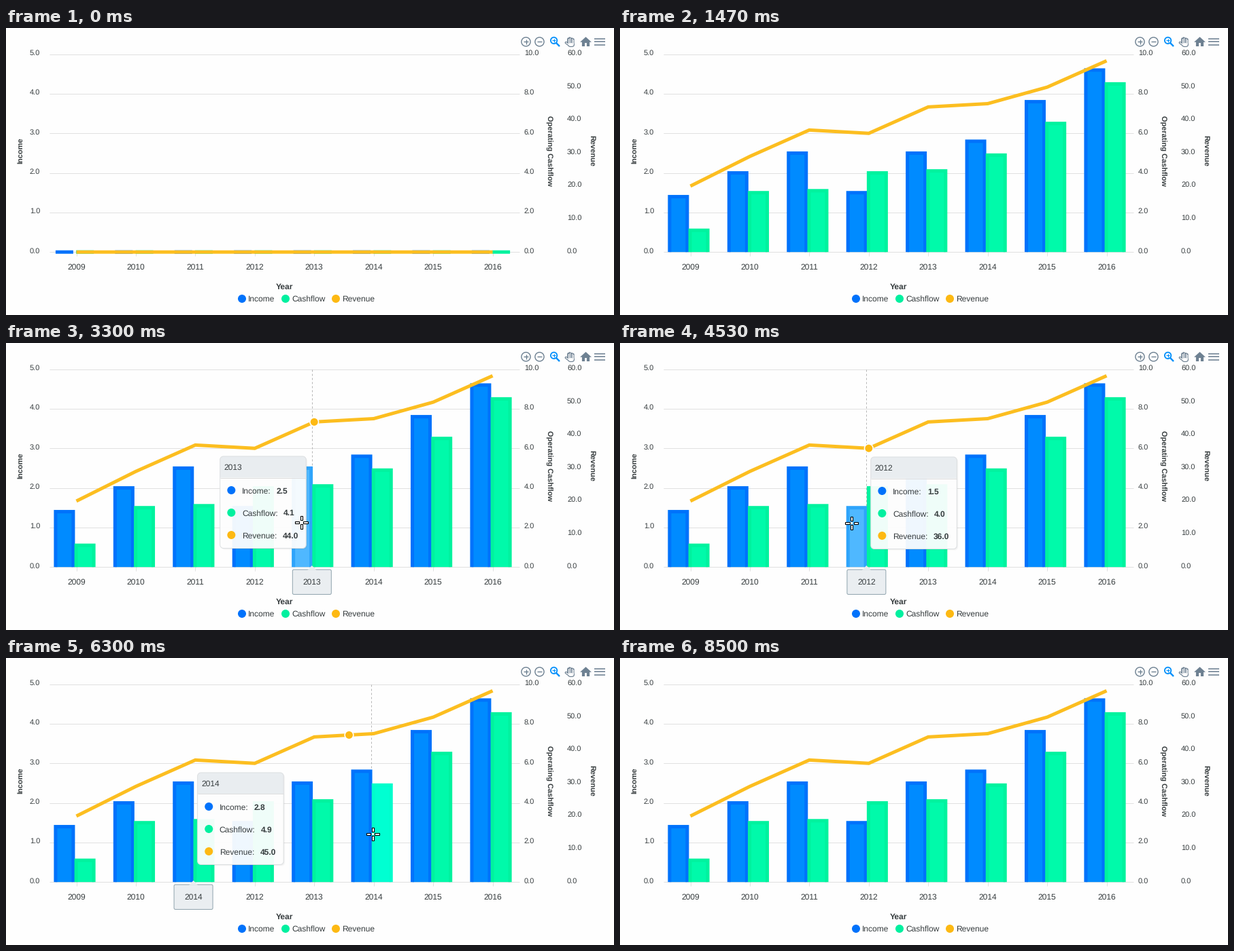
Animation of 894x423 px, one loop 9.01 s. Source, as a matplotlib script:

```python
import numpy as np
import matplotlib as mpl
import matplotlib.pyplot as plt
from matplotlib.animation import FuncAnimation
from matplotlib.patches import Circle, Polygon, Rectangle
from matplotlib.transforms import Affine2D

W, H, DPI = 894, 423, 64
LOOP, STEP = 9010, 34
PX = 72 / DPI  # one pixel in points

mpl.rcParams.update({"font.family": "Liberation Sans", "text.hinting": "none",
                     "toolbar": "None"})

YEARS = range(2009, 2017)
INCOME = np.array([1.4, 2, 2.5, 1.5, 2.5, 2.8, 3.8, 4.6])
CASH = np.array([1.1, 3, 3.1, 4, 4.1, 4.9, 6.5, 8.5])
REVENUE = np.array([20, 29, 37, 36, 44, 45, 50, 58])
TOP, BASE, LEFT, RIGHT = 38.6, 330.2, 64, 755
PLOT_H = BASE - TOP
PITCH = 87.43
TICKS = 103.5 + PITCH * np.arange(8)

PAPER, INK, GREY, SKY = "#fefefe", "#373d3f", "#6e8192", "#008ffb"
BLUE, GREEN, GOLD = "#0072fb", "#00f09f", "#fdb913"
SERIES = [("Income", INCOME, BLUE), ("Cashflow", CASH, GREEN), ("Revenue", REVENUE, GOLD)]
# (fill, stroke) of a bar: normal and hovered
BLUE_LOOK = [("#008bff", "#0072fb"), ("#4fb8ff", "#2ea4fb")]
GREEN_LOOK = [("#00faaa", "#00f29e"), ("#00ffd2", "#00fdcc")]

fig = plt.figure(figsize=(W / DPI, H / DPI), dpi=DPI, facecolor=PAPER)
ax = fig.add_axes([0, 0, 1, 1])
ax.set_xlim(0, W)
ax.set_ylim(H, 0)
ax.axis("off")


def text(x, y, s, size=12, ha="left", **kw):
    kw = {"color": INK, "va": "baseline", "zorder": 5, **kw}
    return ax.text(x, y, s, fontsize=size * PX, ha=ha, **kw)


def line(xs, ys, color, lw=1.0, cap="butt", **kw):
    return ax.plot(xs, ys, color=color, lw=lw * PX, solid_capstyle=cap,
                   solid_joinstyle="miter", **kw)[0]


def shape(pts, fill, edge="none", lw=1.0, **kw):
    return ax.add_patch(Polygon(pts, facecolor=fill, edgecolor=edge, lw=lw * PX,
                                snap=False, **kw))


def dot(x, y, r, fill, edge="none", lw=0.0, **kw):
    return ax.add_patch(Circle((x, y), r, facecolor=fill, edgecolor=edge, lw=lw * PX, **kw))


def plus(x, y, r, color, lw):
    line([x - r, x + r], [y, y], color, lw)
    line([x, x], [y - r, y + r], color, lw)


def panel(w, h, r_top, r_bottom):
    """Outline of a box with rounded corners, from its top left."""
    corners = [(r_top, r_top, r_top, 180), (w - r_top, r_top, r_top, 270),
               (w - r_bottom, h - r_bottom, r_bottom, 0), (r_bottom, h - r_bottom, r_bottom, 90)]
    pts = []
    for cx, cy, r, start in corners:
        a = np.radians(np.linspace(start, start + 90, 7))
        pts += list(zip(cx + r * np.cos(a), cy + r * np.sin(a)))
    return np.array(pts)


def scale_labels(x, top, count, ha="left"):
    for f in np.linspace(0, 1, count):
        text(x, BASE + 1.2 - PLOT_H * f, f"{top * f:.1f}", 11, ha)


# --- axes, titles, legend ---
for y in np.linspace(TOP, BASE, 6):
    line([LEFT, RIGHT], [y, y], "#e0e0e0", zorder=1)
for x, year in zip(TICKS, YEARS):
    line([x, x], [BASE, BASE + 6], "#e0e0e0", zorder=1)
    text(x, 356.3, str(year), ha="center")
scale_labels(50, 5, 6, "right")
scale_labels(761.7, 10, 6)
scale_labels(825, 60, 7)
for x, name, angle in [(20.9, "Income", 90), (797.8, "Operating Cashflow", -90),
                       (861, "Revenue", -90)]:
    text(x, 181, name, 11, "center", va="center", rotation=angle, weight="bold")
text(409.6, 385.2, "Year", ha="center", weight="bold")
for x, (name, _, color) in zip((347, 411, 485), SERIES):
    dot(x, 399, 6, color, zorder=5)
    text(x + 9, 403.3, name)

# --- toolbar ---
for x in (764.5, 784.5):
    dot(x, 20.3, 6.6, "none", GREY, 1.4)
    line([x - 3.6, x + 3.6], [20.3, 20.3], GREY, 1.4)
line([764.5, 764.5], [16.7, 23.9], GREY, 1.4)
dot(805.6, 18.4, 4.7, "none", SKY, 1.8)
plus(805.6, 18.4, 2.3, SKY, 1.2)
line([809, 814], [21.9, 27], SKY, 2.4)
for lw, color in ((3.6, GREY), (1.2, PAPER)):  # hand: strokes, then their inside
    for i in range(4):
        x = 827 + 2.3 * i
        line([x, x], [15 + 0.6 * (i - 1) ** 2, 23], color, lw, "round")
    line([823.4, 828], [21.6, 25], color, lw, "round")
    line([828.8, 832.2], [24, 24], color, lw + 3.5, "round")
shape([(844.1, 20.8), (852.5, 13.1), (860.9, 20.8)], GREY)
line([846.6, 858.4], [21.4, 21.4], GREY, 2)
for x in (848.7, 856.3):
    line([x, x], [20.5, 27.4], GREY, 4.2)
for i in range(3):
    line([865.3, 880.5], [16 + 4.3 * i] * 2, GREY, 1.6)

# --- bars and revenue line ---
BAR_W = 26


def make_bars(values, top, offset, look, z):
    fill, edge = look[0]
    return [(shape([(0, 0)], fill, edge, 5, closed=False, zorder=z,
                   capstyle="butt", joinstyle="miter"), x + offset, PLOT_H * v / top, look)
            for x, v in zip(TICKS, values)]


blue_bars = make_bars(INCOME, 5, -30.6, BLUE_LOOK, 3)
green_bars = make_bars(CASH, 10, -0.4, GREEN_LOOK, 3.1)
REV_H = PLOT_H * REVENUE / 60
curve = line(TICKS, BASE - REV_H, "#fcbe20", 5, zorder=4, snap=False)
cross = line([0, 0], [TOP, BASE], "#b6b6b6", ls=(0, (3, 3)), zorder=2)
marker = dot(0, 0, 6.3, GOLD, "#ffffff", 1.6, zorder=6)

# --- tooltip over the plot ---
TIP_W, TIP_H, HEAD = 126.5, 135.5, 31.5
tip_move, tag_move, cur_move = Affine2D(), Affine2D(), Affine2D()
tip_tr, tag_tr, cur_tr = (m + ax.transData for m in (tip_move, tag_move, cur_move))
tip = []  # (artist, full opacity)


def in_tip(art, alpha=1.0):
    tip.append((art, alpha))
    return art


body = panel(TIP_W, TIP_H, 5, 5)
for grow in (2, 1):
    in_tip(shape(body + grow, "#777777", transform=tip_tr, zorder=8), 0.06)
in_tip(shape(body, "#ffffff", transform=tip_tr, zorder=8.1), 0.94)
in_tip(shape(panel(TIP_W, HEAD, 5, 0), "#e9edf0", transform=tip_tr, zorder=8.2), 0.97)
in_tip(line([0, TIP_W], [HEAD, HEAD], "#dddddd", transform=tip_tr, zorder=8.3))
in_tip(shape(body, "none", "#dcdfe1", transform=tip_tr, zorder=8.4))
tip_title = in_tip(text(6, 20.3, "", transform=tip_tr, zorder=9))
tip_values = []
for i, (label_w, (name, _, color)) in enumerate(zip((42.7, 52.7, 51.4), SERIES)):
    y = 50 + 33 * i
    in_tip(dot(16.6, y, 6, color, transform=tip_tr, zorder=9))
    in_tip(text(32.2, y + 4.5, name + ":", transform=tip_tr, zorder=9))
    tip_values.append(in_tip(text(40.6 + label_w, y + 4.5, "", weight="bold",
                                  transform=tip_tr, zorder=9)))

# --- label on the year axis ---
in_tip(shape(panel(57, 36.5, 2, 2) + (-28.5, 334), "#eaeef1", "#90a4ae",
             transform=tag_tr, zorder=7))
in_tip(shape([(-6.5, 334.8), (0, 328), (6.5, 334.8)], "#eaeef1", transform=tag_tr, zorder=7.1))
tag_text = in_tip(text(0, 356.3, "", ha="center", transform=tag_tr, zorder=7.2))

# --- mouse cursor: four arms around a small centre ---
cursor = []
for dx, dy in [(1, 0), (-1, 0), (0, 1), (0, -1), (0, 0)]:
    w, h = 3 + 3.5 * abs(dx), 3 + 3.5 * abs(dy)
    edge = "#000000" if dx or dy else "none"
    cursor.append(ax.add_patch(Rectangle((6.25 * dx - w / 2, 6.25 * dy - h / 2), w, h,
                                         facecolor="#ffffff", edgecolor=edge, lw=1.1 * PX,
                                         transform=cur_tr, zorder=12)))

# --- motion: the mouse stops, everything else follows them ---
ENTER, GONE = 2630, 8500
# start, arrival, x, y
STOPS = [(ENTER, 3300, 434, 264), (3530, 3760, 152, 262), (3920, 4180, 342, 265),
         (4500, 4730, 327, 266), (4900, 5250, 262, 266), (5900, 6300, 539, 259),
         (6550, 6980, 666, 241), (7470, 7800, 400, 150), (8050, 8370, 158, 27),
         (8420, 8430, 129, 13)]


def column(x):
    return int(np.clip((x - 60) // PITCH, 0, 7))


COLS = [column(stop[2]) for stop in STOPS]
TIP_X = np.where(TICKS < LEFT + (RIGHT - LEFT) / 2, TICKS + 3, TICKS - 12 - TIP_W)
TAG_X = TICKS - 3.4
TIP_STOPS = [np.array([TIP_X[c], y - 97, TAG_X[c]]) for c, (*_, y) in zip(COLS, STOPS)]
TIP_LAG, MARKER_LAG = (0, 250), (-200, 70)


def ease(u):
    u = np.clip(u, 0, 1)
    return u * u * (3 - 2 * u)


def glide(t, values, spans, pos):
    """Move from value to value, each within its span of time."""
    for v, (t0, t1) in zip(values, spans):
        pos = pos + (v - pos) * ease((t - t0) / (t1 - t0))
    return pos


def follow(t, values, lag):
    spans = [(stop[1] + lag[0], stop[1] + lag[1]) for stop in STOPS]
    return glide(t, values, spans, values[0])


def cursor_at(t):
    if not ENTER <= t < GONE:
        return None
    return glide(t, [np.array(s[2:]) for s in STOPS], [s[:2] for s in STOPS],
                 np.array([440, 407]))


def grown(t, delay=0.0):
    u = np.clip((t - 70 - delay) / 810, 0, 1)
    return 0.5 - 0.5 * np.cos(np.pi * u)


def draw_bars(bars, t, mouse):
    """Set heights and colours; return whether the mouse is on a bar."""
    hit = False
    for i, (art, x, full, look) in enumerate(bars):
        x1, y = x + BAR_W, BASE - full * grown(t, 85 * i)
        art.set_xy([(x, BASE), (x, y), (x1, y), (x1, BASE), (x, BASE)])
        over = bool(mouse is not None and x - 2 < mouse[0] < x1 + 2
                    and y - 2.5 < mouse[1] < BASE)
        hit = hit or over
        fill, edge = look[over]
        art.set_facecolor(fill)
        art.set_edgecolor(edge)
    return hit


def update(k):
    t = (k + 0.5) * STEP
    mouse = cursor_at(t)
    on_green = draw_bars(green_bars, t, mouse)
    draw_bars(blue_bars, t, None if on_green else mouse)
    curve.set_ydata(BASE - REV_H * grown(t))

    fade = 0.0
    if mouse is not None:
        cur_move.clear().translate(*mouse)
        fade = float(np.clip(min(BASE - mouse[1], mouse[1] - TOP) / 25, 0, 1))
        i = column(mouse[0])
        cross.set_xdata([TAG_X[i]] * 2)
        tip_title.set_text(str(YEARS[i]))
        tag_text.set_text(str(YEARS[i]))
        for art, (_, values, _) in zip(tip_values, SERIES):
            art.set_text(f"{values[i]:.1f}")
    for art in cursor:
        art.set_visible(mouse is not None)
    for art in (cross, marker):
        art.set_visible(fade > 0)
    for art, alpha in tip:
        art.set_visible(fade > 0)
        art.set_alpha(alpha * fade)

    m = follow(t, COLS, MARKER_LAG)
    marker.center = (TICKS[0] + PITCH * m, BASE - np.interp(m, range(8), REV_H))
    x, y, tag = follow(t, TIP_STOPS, TIP_LAG)
    tip_move.clear().translate(x, y)
    tag_move.clear().translate(tag, 0)
    return []


anim = FuncAnimation(fig, update, frames=LOOP // STEP, interval=STEP,
                     repeat=True, repeat_delay=0, blit=False)
plt.show()
```
